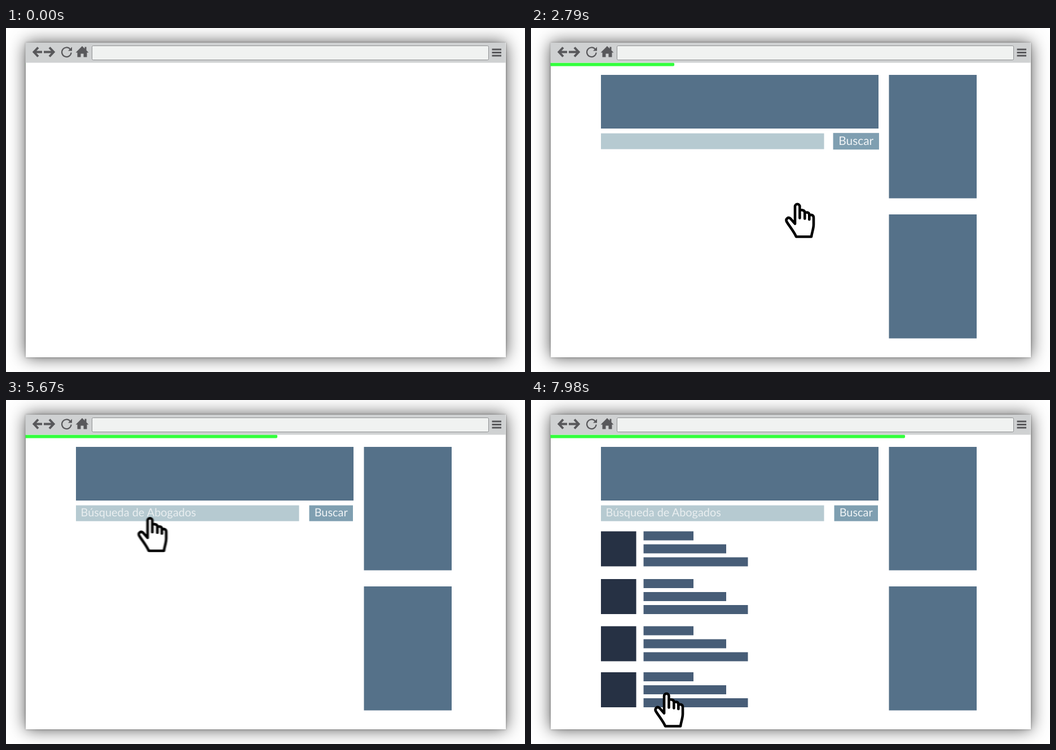
Animation, 920 px wide and 609 px high, one loop 8 s. Source, as an HTML page:

```html
<!DOCTYPE html>
<html lang="es">
<head>
<meta charset="utf-8">
<title>Búsqueda</title>
<style>
  html, body { margin: 0; width: 100%; height: 100%; overflow: hidden; background: #fff; }
  #window {
    position: absolute; left: 34.5px; top: 26px; width: 851px; height: 556.5px;
    background: #fff; box-shadow: 0 0 28px rgba(0, 0, 0, .68), 0 0 4px rgba(0, 0, 0, .3);
  }
  svg { position: absolute; left: 0; top: 0; display: block; }
  text { font: 19.9px Lato, "Open Sans", sans-serif; text-rendering: geometricPrecision; }
  .block { fill: #557189; }
  .avatar { fill: #263144; }
  .line { fill: #475d77; }
</style>
</head>
<body>
<div id="window"></div>
<svg width="920" height="609" viewBox="0 0 920 609">
  <defs>
    <clipPath id="page"><rect x="34.5" y="61.5" width="851" height="521"/></clipPath>
    <filter id="blur" filterUnits="userSpaceOnUse" x="-80" y="-60" width="180" height="200"
      color-interpolation-filters="sRGB"><feGaussianBlur stdDeviation="0"/></filter>
  </defs>

  <rect x="34.5" y="26" width="851" height="35.5" fill="#cfd1d2"/>
  <rect x="152.5" y="31.5" width="703" height="25" rx="2" fill="#f0f2f1" stroke="#8e9092"/>
  <g fill="none" stroke="#58585b" stroke-width="4">
    <path d="M64 42.5H50M57 34.5L49.5 42.5L57 50.5M67 42.5H84M77 34.5L84.5 42.5L77 50.5"/>
    <path d="M113.5 37.2A8.3 8.3 0 1 0 115.6 43.5" stroke-width="2.2"/>
    <path d="M861.5 38H878M861.5 43.5H878M861.5 49H878" stroke-width="3.2"/>
  </g>
  <path d="M117 33.5V40.5H110ZM123.5 43.5L135 32L139.5 36.5V33.5H142.5V39.5L146.5 43.5H143.5V51.5H137.5V45.5H132.5V51.5H126.5V43.5Z" fill="#58585b"/>

  <g clip-path="url(#page)">
    <g id="layout">
      <rect class="block" x="124" y="83" width="492" height="95"/>
      <rect class="block" x="634.5" y="83" width="155.5" height="218.5"/>
      <rect class="block" x="634.5" y="330" width="155.5" height="219.5"/>
      <rect id="field" x="124" y="186.5" width="395.5" height="28" fill="#b6cad1"/>
      <text id="query" x="132.5" y="206.3" fill="#e9eef0"></text>
      <g id="button">
        <rect x="537.5" y="186.5" width="77.5" height="28" fill="#7f9fb1"/>
        <text x="576.2" y="206.3" text-anchor="middle" fill="#f0f4f6">Buscar</text>
      </g>
    </g>
    <g id="results"></g>
    <rect id="progress" x="28" y="61.5" height="6" rx="2" fill="#33ff3d"/>
    <g id="hand">
      <path fill="#fff" stroke="#000" stroke-width="4.6" stroke-linejoin="round" stroke-linecap="round"
        d="M-4 37V6.5A4.2 4.2 0 0 1 4.4 6.5V14C6 12.3 13 12 13.3 17V18.5C15 16.2 21 16.2 21.3 21V22.5C24 20.5 29 21 29 26.5V38C29 46 26 52 25 60H-2C-5 52 -15 40 -19 33C-21 28 -16 24.5 -12 28ZM4.4 14V27M13.3 18V28M21.3 22V29.5"/>
    </g>
  </g>
</svg>
<script>
const LOOP = 8000, STEP = 30, QUERY = 'Búsqueda de Abogados';
const $ = id => document.getElementById(id);
const clamp = v => Math.min(1, Math.max(0, v));
const ease = u => u * u * (3 - 2 * u);
const ramp = (t, from, to) => ease(clamp((t - from) / (to - from)));

// Fingertip path: time, x, y
const PATH = [
  [390, -85, 301], [420, -29, 303], [510, 111, 308.5], [700, 318, 309], [900, 428, 309.5],
  [1281, 472, 309.5], [2820, 472, 309.5], [3240, 366, 244], [3580, 309, 208.5], [3940, 309, 208.5],
  [4400, 566, 215], [4520, 566, 215], [4600, 550, 214], [4770, 503, 210.5], [4860, 479, 209.5],
  [5670, 255, 207], [5900, 205, 222], [6130, 178, 263], [6480, 165, 333], [6540, 162, 345],
  [6970, 166, 431], [7290, 190, 493], [7600, 228, 520], [7980, 240, 517.5]
];

// Monotone cubic interpolation, so that holds stay still
function slope(i, axis) {
  if (i < 1 || i > PATH.length - 2) return 0;
  const rate = j => (PATH[j + 1][axis] - PATH[j][axis]) / (PATH[j + 1][0] - PATH[j][0]);
  const a = rate(i - 1), b = rate(i);
  return a * b > 0 ? 2 * a * b / (a + b) : 0;
}

function along(t, axis) {
  const last = PATH.length - 1;
  if (t <= PATH[0][0]) return PATH[0][axis];
  if (t >= PATH[last][0]) return PATH[last][axis];
  const i = PATH.findIndex(key => key[0] > t) - 1;
  const p = PATH[i], q = PATH[i + 1], span = q[0] - p[0], u = (t - p[0]) / span;
  const s = ease(u);
  return p[axis] * (1 - s) + q[axis] * s
    + span * u * (1 - u) * ((1 - u) * slope(i, axis) - u * slope(i + 1, axis));
}

function scaleAt(node, x, y, s) {
  node.setAttribute('transform', `translate(${x} ${y}) scale(${s}) translate(${-x} ${-y})`);
}

const rect = (cls, x, y, w, h) => `<rect class="${cls}" x="${x}" y="${y}" width="${w}" height="${h}"/>`;

const rows = [[232.5, 6130], [317, 6540], [400.5, 6970], [482, 7400]].map(([y, peak]) => {
  const node = document.createElementNS('http://www.w3.org/2000/svg', 'g');
  node.innerHTML = rect('avatar', 124, y, 62.5, 62)
    + [88.5, 146.5, 185].map((w, i) => rect('line', 199.5, y + 23 * i, w, 16)).join('');
  $('results').append(node);
  return { node, y: y + 31, peak };
});

const blur = document.querySelector('feGaussianBlur');

function drawHand(t) {
  const [x, y] = [1, 2].map(axis => along(t, axis));
  // Half a step of open shutter
  const [bx, by] = [1, 2].map(axis => Math.abs(along(t + 7.5, axis) - along(t - 7.5, axis)) / 3.46);
  const hand = $('hand');
  hand.setAttribute('transform', `translate(${x} ${y})`);
  if (Math.max(bx, by) > .25) {
    blur.setAttribute('stdDeviation', `${bx} ${by}`);
    hand.setAttribute('filter', 'url(#blur)');
  } else {
    hand.removeAttribute('filter');
  }
}

function draw(t) {
  const shown = ramp(t, 30, 420);
  $('layout').setAttribute('opacity', shown);
  $('layout').setAttribute('transform', `translate(0 ${20 * (1 - shown)})`);

  $('progress').setAttribute('width', 6.2 + .0788 * t);

  const hover = ramp(t, 3270, 3450) - ramp(t, 3900, 4090);
  scaleAt($('field'), 321.75, 200.5, 1 + .044 * hover);
  scaleAt($('button'), 576.25, 200.5, 1.05 - .05 * ramp(t, 4430, 4550));
  $('query').textContent = QUERY.slice(0, Math.max(0, Math.ceil((t - 3380) / 42)));

  for (const { node, y, peak } of rows) {
    const s = 1.05 * ramp(t, peak - 200, peak) - .05 * ramp(t, peak, peak + 200);
    node.setAttribute('visibility', s > 0 ? 'visible' : 'hidden');
    scaleAt(node, 254.25, y, s);
  }
  drawHand(t);
}

const start = performance.now();
function tick() {
  const t = (performance.now() - start) % LOOP;
  draw(Math.floor(t / STEP) * STEP);
  requestAnimationFrame(tick);
}
tick();
</script>
</body>
</html>
```
